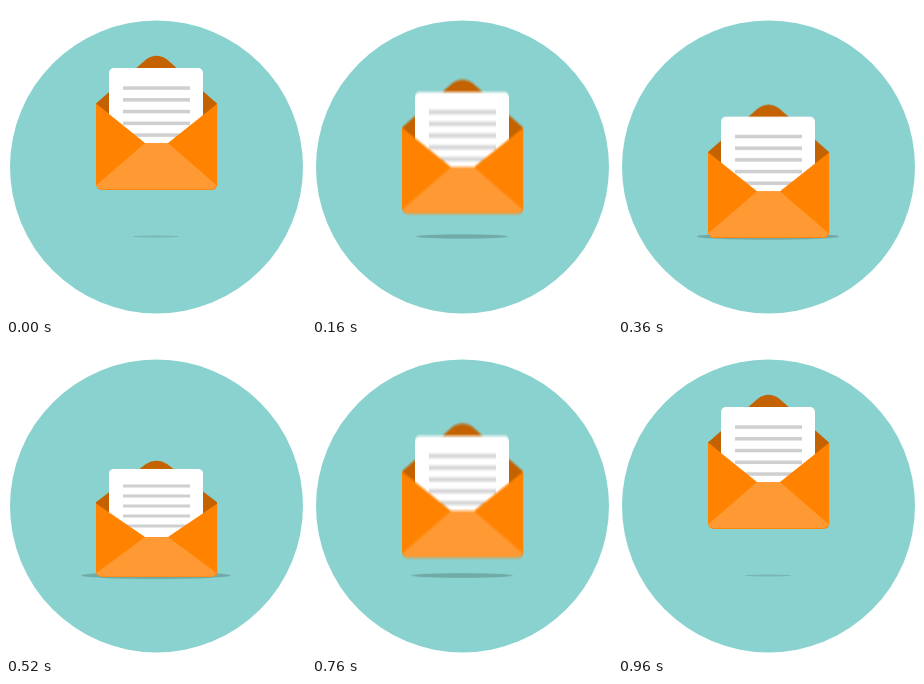
Write an HTML page with a canvas that moves like this. It is 300 px wide and 311 px high and loops after 1 s.

```html
<!DOCTYPE html>
<html lang="en">
<head>
<meta charset="utf-8">
<title>Bouncing letter</title>
<style>
html, body { margin: 0; width: 100%; height: 100%; overflow: hidden; background: #fff; }
canvas { display: block; width: 100vw; height: 100vh; }
</style>
</head>
<body>
<canvas id="stage" width="300" height="311"></canvas>
<script>
const W = 300, H = 311, LOOP = 1000, STEP = 40;
const SHUTTER = 20, SAMPLES = 6;
const DROP = 48, BASE = 184;

const out = document.getElementById('stage').getContext('2d');
const layer = document.createElement('canvas');
layer.width = W;
layer.height = H;
const g = layer.getContext('2d');

const clamp = x => Math.max(0, Math.min(1, x));
const smooth = u => u * u * (3 - 2 * u);
const ramp = (t, a, b) => smooth(clamp((t - a) / (b - a)));

// Quick start, long settle: cubic bezier (.17, 0, .5, 1)
function settle(x) {
  let lo = 0, hi = 1;
  for (let i = 0; i < 20; i++) {
    const u = (lo + hi) / 2, v = 1 - u;
    if (0.51 * u * v * v + 1.5 * u * u * v + u * u * u < x) lo = u;
    else hi = u;
  }
  return smooth((lo + hi) / 2);
}

function pose(t) {
  return {
    drop: DROP * (ramp(t, 0, 320) - ramp(t, 620, 945)),
    squash: ramp(t, 340, 500) - ramp(t, 520, 635),
    spread: settle(clamp(t / 470)) - ramp(t, 570, 960)
  };
}

function poly(color, ...pts) {
  g.fillStyle = color;
  g.beginPath();
  pts.forEach(([x, y]) => g.lineTo(x, y));
  g.closePath();
  g.fill();
}

function shadow(spread) {
  const w = 46 + 104 * spread;
  g.fillStyle = `rgba(0,0,0,${0.13 + 0.06 * clamp(spread * 3)})`;
  g.beginPath();
  g.ellipse(150, 230.5, w / 2, w * 0.023, 0, 0, 7);
  g.fill();
}

function flap() {
  g.fillStyle = '#c46200';
  g.beginPath();
  g.moveTo(90, 97.5);
  g.lineTo(140, 53.5);
  g.quadraticCurveTo(150.5, 46, 161, 53.5);
  g.lineTo(211, 97.5);
  g.lineTo(211, 150);
  g.lineTo(90, 150);
  g.fill();
}

function paper() {
  g.fillStyle = '#fff';
  g.beginPath();
  g.roundRect(103, 62, 94, 92, 5);
  g.fill();
  g.fillStyle = '#cfcfd1';
  for (let i = 0; i < 5; i++) g.fillRect(117, 80.3 + i * 11.75, 67, 3.5);
}

function front() {
  g.save();
  g.beginPath();
  g.roundRect(90, 90, 121.5, BASE - 90, [0, 0, 6, 6]);
  g.clip();
  poly('#ff8300', [90, 97.5], [139, 137], [162, 137], [211.5, 97.5], [211.5, BASE], [90, BASE]);
  poly('#ff9933', [139, 137], [162, 137], [211, 179.5], [207, 183.3], [94, 183.3], [90, 179.5]);
  g.restore();
}

// Scales a part vertically about the envelope's bottom edge
function part(draw, drop, scale, lift = 0) {
  g.save();
  g.translate(0, BASE + drop - lift);
  g.scale(1, scale);
  g.translate(0, -BASE);
  draw();
  g.restore();
}

function scene(t) {
  const { drop, squash, spread } = pose(t);
  g.fillStyle = '#fff';
  g.fillRect(0, 0, W, H);
  g.fillStyle = '#8ad2cf';
  g.beginPath();
  g.arc(150.5, 161, 146.5, 0, 7);
  g.fill();
  shadow(spread);
  const scale = 1 - 0.15 * squash;
  part(flap, drop, 1 - 0.135 * squash);
  part(paper, drop, scale, 4.3 * squash);
  part(front, drop, scale);
}

// Averages a few moments around t for motion blur
function render(t) {
  for (let i = 0; i < SAMPLES; i++) {
    const dt = SHUTTER * ((i + 0.5) / SAMPLES - 0.5);
    scene((t + dt + LOOP) % LOOP);
    out.globalAlpha = 1 / (i + 1);
    out.drawImage(layer, 0, 0);
  }
}

const start = performance.now();
function tick() {
  const t = (performance.now() - start) % LOOP;
  render(Math.floor(t / STEP) * STEP);
  requestAnimationFrame(tick);
}
tick();
</script>
</body>
</html>
```
